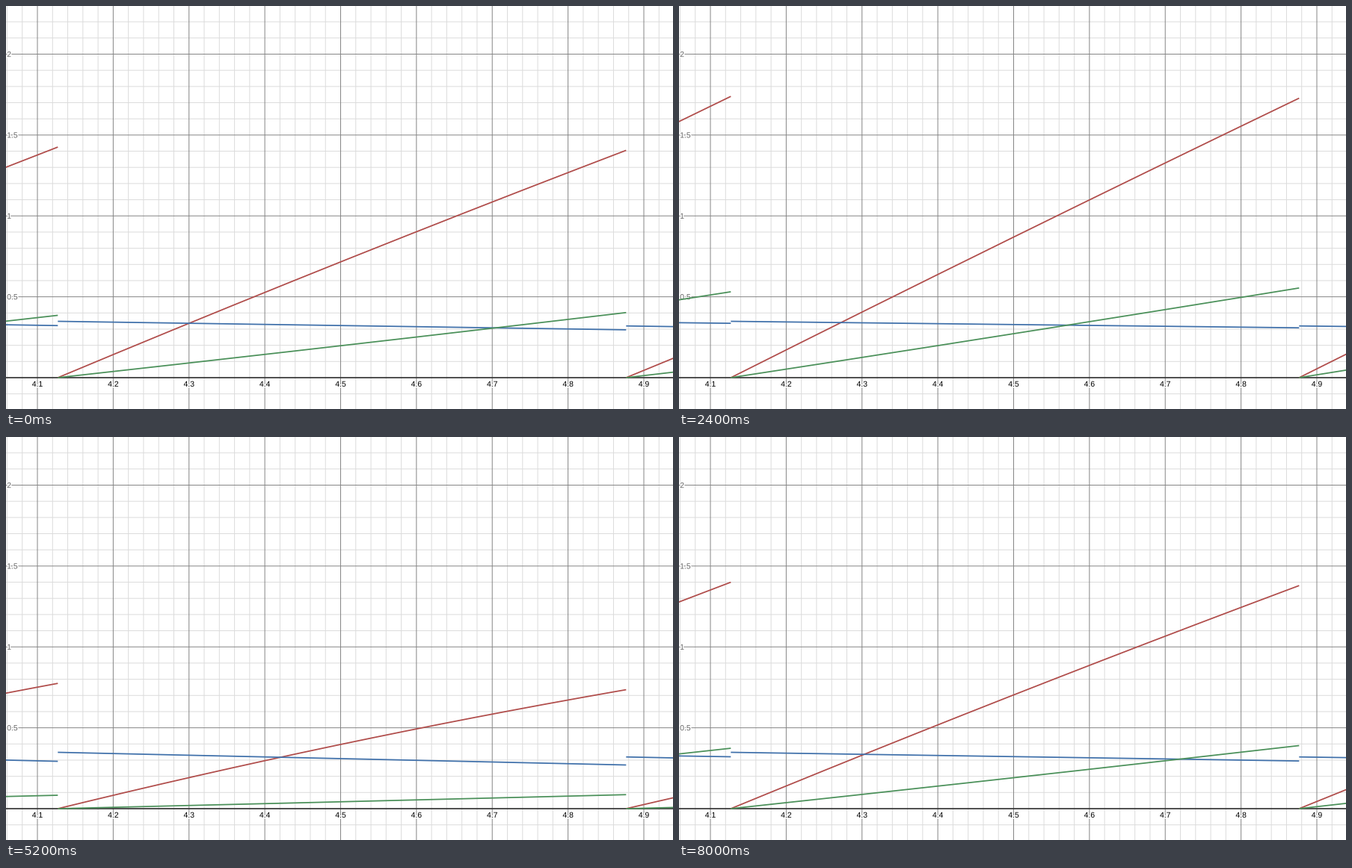
These frames come from a looping animation (892x540 px, 8.1 s). A matplotlib script:

```python
import numpy as np
import matplotlib.pyplot as plt
from matplotlib.animation import FuncAnimation
from matplotlib.patches import Polygon
from matplotlib.patheffects import withStroke

plt.rcParams["text.hinting"] = "no_hinting"

W, H, DPI = 892, 540, 100
FRAMES, INTERVAL = 81, 100
PX = 72 / DPI                      # one pixel in points

X41, X_UNIT = 42.0, 1013.75        # screen x of 4.1, pixels per unit
Y0, Y_UNIT = 498.0, 216.75         # screen y of 0, pixels per unit
JUMP, PERIOD = 69.3, 760.0         # first discontinuity and segment width

RED, BLUE, GREEN = "#b04c4a", "#3f70aa", "#4a9059"

# Slider sweeping up and down: (ms, value) where its speed changes
SWEEP = [(0, .646), (1300, 1), (1650, 1.1), (1800, 1.08), (2400, .89),
         (4100, .43), (5680, .012), (6300, .185), (8000, .626)]

fig = plt.figure(figsize=(W / DPI, H / DPI), dpi=DPI, facecolor="white")
ax = fig.add_axes([0, 0, 1, 1])
ax.set_xlim(0, W)
ax.set_ylim(H, 0)
ax.axis("off")


def screen_x(value):
    return X41 + (value - 4.1) * X_UNIT


def screen_y(value):
    return Y0 - value * Y_UNIT


def grid_style(i):
    major = i % 5 == 0
    return dict(lw=PX, snap=False, zorder=2 if major else 1,
                color="#868686" if major else "#dcdcdc")


def draw_grid():
    for i in range(-2, 42):
        ax.axvline(screen_x(4.1 + i * 0.02), **grid_style(i))
    for i in range(-1, 23):
        ax.axhline(screen_y(i * 0.1), **grid_style(i))
    ax.axhline(Y0, lw=1.4 * PX, color="#222222", snap=False, zorder=3)


def label(x, y, text, color, align):
    ax.text(x, y, text, color=color, ha=align, va="center_baseline",
            family="Liberation Sans", fontsize=10.4 * PX, zorder=4,
            path_effects=[withStroke(linewidth=3 * PX, foreground="white")])


def draw_labels():
    for value in np.arange(9) / 10 + 4.1:
        label(screen_x(value), 506.3, f"{value:.1f}", "black", "center")
    for value in np.arange(1, 5) / 2:
        label(1.2, screen_y(value), f"{value:g}", "#666666", "left")


def make_line(color, z):
    return ax.plot([], [], color=color, lw=1.75 * PX, zorder=z,
                   solid_capstyle="butt", solid_joinstyle="round")[0]


draw_grid()
draw_labels()
red, blue, green = make_line(RED, 5), make_line(BLUE, 6), make_line(GREEN, 7)

ARROW = np.array([(0, 0), (0, 11.5), (2.6, 9.2), (4.3, 13.2), (6, 12.4),
                  (4.3, 8.6), (7.6, 8.4)])
cursor = ax.add_patch(Polygon(ARROW, facecolor="black", edgecolor="white",
                              lw=0.8 * PX, zorder=9))

u = np.linspace(0, 1, 50)
bow = 4 * u * (1 - u)


def curves(q):
    """Screen points of the three sawtooth curves, NaN between segments."""
    xs, reds, blues, greens = [], [], [], []
    for k in (-1, 0, 1):
        red_end = 119.6 - 9.6 * k + (286.4 + 8.1 * k) * q
        green_end = (135 + 5.7 * k) * q
        drop = 18.5 - 1.5 * k - (11 - 1.5 * k) * q
        xs += [*(JUMP + PERIOD * (k + u)), np.nan]
        reds += [*(Y0 - red_end * u - (7.6 - 6.3 * q) * bow), np.nan]
        blues += [*(422.5 + 6.2 * k + drop * u), np.nan]
        greens += [*(Y0 - green_end * u + q * bow), np.nan]
    return xs, reds, blues, greens


def update(frame):
    ms = frame * INTERVAL
    q = np.interp(ms, *zip(*SWEEP), period=FRAMES * INTERVAL)
    xs, *ys = curves(q)
    for line, y in zip((red, blue, green), ys):
        line.set_data(xs, y)
    cursor.set_visible(1200 <= ms <= 1400)
    cursor.set_xy(ARROW + (409.3, 529.5 + 5 * abs(ms - 1300) / 100))
    return red, blue, green, cursor


anim = FuncAnimation(fig, update, frames=FRAMES, interval=INTERVAL,
                     repeat=True, repeat_delay=0, blit=False)
plt.show()
```
